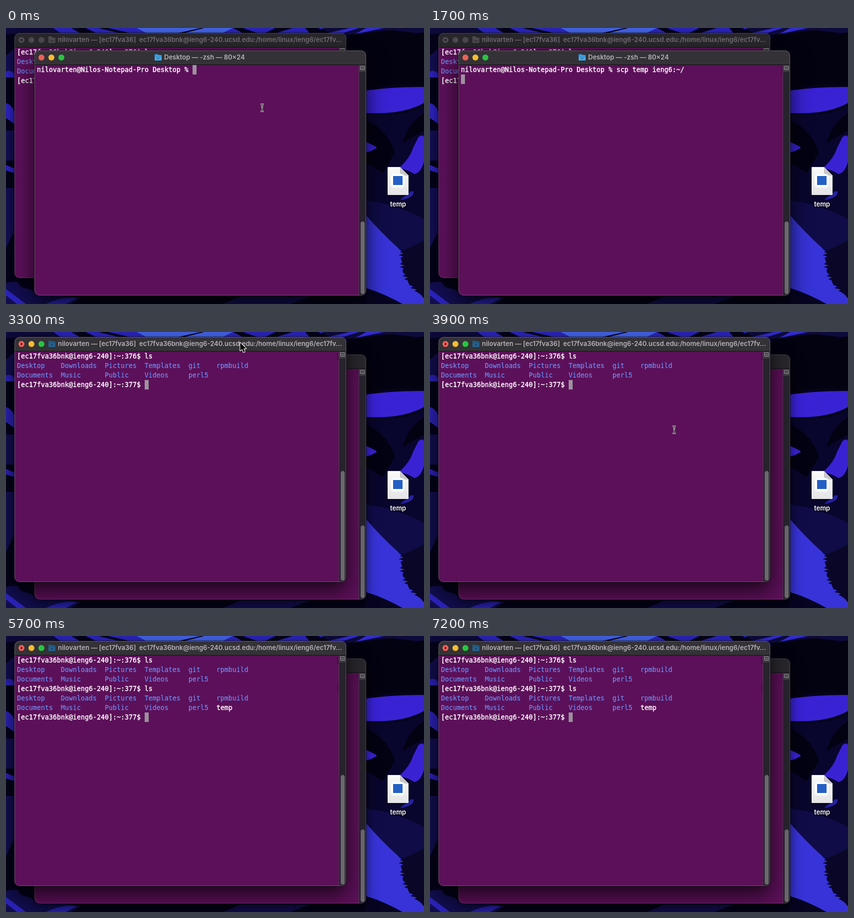
Recreate the animation shown at these times as an HTML page with a canvas. Size 838 px wide and 552 px high, loop 7.3 s.

```html
<!DOCTYPE html>
<html lang="en">
<head>
<meta charset="utf-8">
<title>Copying a file with scp</title>
<style>
  html, body { margin: 0; width: 838px; height: 552px; overflow: hidden; background: #05031a; }
  canvas { display: block; }
</style>
</head>
<body>
<canvas id="stage" width="838" height="552"></canvas>
<script>
const W = 838, H = 552, LOOP = 7300;
const ctx = document.getElementById('stage').getContext('2d');
const MONO = '"DejaVu Sans Mono", monospace';
const SANS = 'Inter, sans-serif';
const COL = 8, ROW = 19;
const WHITE = '#ffffff', BLUE = '#6c93fb';

// Times in ms
const T = { type: 250, typed: 1500, enter: 1600, copied: 2300, wake: 2600,
            front: 3100, leave: 3400, rest: 4100, l: 4900, s: 5100, list: 5400 };

const USER = 'nilovarten', COURSE = 'ec17fva36', LOGIN = COURSE + 'bnk';
const LOCAL = USER + '@Nilos-Notepad-Pro Desktop % ';
const REMOTE = n => `[${LOGIN}@ieng6-240]:~:${n}$ `;
const COMMAND = 'scp temp ieng6:~/';
const DIRS = [
  'Desktop    Downloads  Pictures  Templates  git    rpmbuild',
  'Documents  Music      Public    Videos     perl5'
];

const scenery = [
  ['#0d0a3c', 'M0 0H150L90 12H0Z M640 0H838V8L722 30L640 12Z'],
  ['#2b25c2', 'M95 0H130L150 11H110Z M160 0H640L600 12H185Z'],
  ['#4566ef', 'M262 0H455L430 12H285Z'],
  ['#05031a', 'M185 0H204L258 12H235Z M390 0H398L350 12H336Z M455 0H475L510 12H478Z M540 0H575L535 12H515Z M600 0H625L655 12H610Z'],
  ['#322bd0', 'M645 10L690 0H708L672 11Z M722 0H758L700 12Z'],
  ['#030210', 'M684 14L770 4L838 12V114Q780 108 722 121V45L684 40Z'],
  ['#3922d4', 'M722 125Q780 117 838 118V150Q795 174 722 170Z'],
  ['#09062d', 'M722 173Q795 179 838 157V380H722Z'],
  ['#030212', 'M722 184Q765 204 780 250L755 290L722 270Z M838 170Q805 190 795 230L838 205Z'],
  ['#3922d4', 'M722 228Q732 232 744 239Q735 246 722 249Z'],
  ['#3922d4', 'M827 218Q838 211 838 220V268Q831 290 819 292Q803 283 788 280Q810 260 816 240Z'],
  ['#2821a8', 'M795 340Q820 318 817 331Q812 341 790 344Z'],
  ['#100c48', 'M722 345Q780 352 838 382V552H722Z'],
  ['#3733d8', 'M722 375Q755 412 784 438L804 458L838 530V552H722Z'],
  ['#070421', 'M722 520Q760 532 795 552H722Z'],
  // left edge
  ['#130f53', 'M0 55L17 40V100L0 95Z M0 205H17V265H0Z M0 320H17V404L0 440Z'],
  ['#2c23be', 'M0 87Q10 83 17 92V99H0Z M0 150Q12 154 17 168V192L0 180Z M0 274L17 281V290L0 285Z'],
  // bottom edge
  ['#120e50', 'M0 510Q30 500 57 530L150 540L130 552H0Z M435 552L470 537H610L570 552Z'],
  ['#2a23ba', 'M0 522L40 552H22L0 535Z M80 552Q110 537 142 540L120 552Z'],
  ['#05031a', 'M18 500Q45 505 55 525L30 518Z']
].map(([color, d]) => [color, new Path2D(d)]);

// Ragged treetops on the lower right
const trees = new Path2D('M838 425');
for (let i = 0; i <= 30; i++) {
  const x = 790 + 45 * (i / 30) ** 3 + (i % 2 ? 5 : 0) + 3 * Math.sin(i * 2.3);
  trees.lineTo(x, 448 + i * 3);
}
trees.lineTo(W, 540);

function fill(color, path) { ctx.fillStyle = color; ctx.fill(path); }
function rect(color, x, y, w, h) { ctx.fillStyle = color; ctx.fillRect(x, y, w, h); }
function round(x, y, w, h, r) {
  const p = new Path2D();
  p.roundRect(x, y, w, h, r);
  return p;
}
function outline(color, path, width = 1) {
  ctx.strokeStyle = color;
  ctx.lineWidth = width;
  ctx.stroke(path);
}
function dot(color, x, y, r) {
  const p = new Path2D();
  p.arc(x, y, r, 0, 7);
  fill(color, p);
}
function text(str, x, y, font, color, align = 'left') {
  ctx.font = font;
  ctx.textAlign = align;
  ctx.fillStyle = color;
  ctx.fillText(str, x, y);
}
function shade(color, blur, y) {
  ctx.shadowColor = color;
  ctx.shadowBlur = blur;
  ctx.shadowOffsetY = y;
}

function drawDesktop() {
  rect('#05031a', 0, 0, W, H);
  for (const [color, path] of scenery) fill(color, path);
  fill('#090628', trees);

  ctx.save();
  shade('rgba(0,0,0,.5)', 4, 1);
  const g = ctx.createLinearGradient(0, 278, 0, 334);
  g.addColorStop(0, '#fafafa');
  g.addColorStop(1, '#e5e4e6');
  fill(g, new Path2D('M766 278H790L807 295V333Q807 334 806 334H766Q765 334 765 333V279Q765 278 766 278Z'));
  ctx.restore();
  fill('#c9c7cb', new Path2D('M790 278L807 295H792Q790 295 790 293Z'));
  fill('#ffffff', round(772, 292, 27, 27, 6));
  rect('#245fc5', 776, 296, 19, 18);

  ctx.save();
  shade('rgba(0,0,0,.9)', 3, 1);
  text('temp', 786, 357, '600 13px ' + SANS, WHITE, 'center');
  ctx.restore();
}

function drawFolder(x, y, color, top) {
  fill(top, round(x, y, 7, 5, 1));
  fill(color, round(x, y + 2, 14, 11, 1.5));
  rect(top, x, y + 4, 14, 1);
  rect('rgba(0,0,0,.2)', x + 4, y + 7, 6, 3);
}

function drawWindow(win, active) {
  const { x, y } = win, w = 665, h = 490;
  const frame = round(x, y, w, h, 10);
  ctx.save();
  shade(active ? 'rgba(0,0,0,.75)' : 'rgba(0,0,0,.55)', active ? 42 : 26, active ? 16 : 8);
  fill('#5c1059', frame);
  ctx.restore();

  ctx.save();
  ctx.clip(frame);
  rect(active ? '#343237' : '#29272c', x, y, w, 28);
  rect('#111014', x, y + 28, w, 1);
  rect('#27232c', x + 651, y + 29, 14, h);
  rect('#454049', x + 650, y + 29, 1, h);
  fill('#6b686e', round(x + 654, win.thumb, 8, y + h - 3 - win.thumb, 4));

  // Split button
  rect('#3c3940', x + 651, y + 29, 13, 14);
  outline('#a09da3', round(x + 653.5, y + 31.5, 8, 7, 0));
  rect('#a09da3', x + 655, y + 35, 5, 1);

  const lights = active ? ['#ed5f57', '#f6bd30', '#29c440'] : ['#4b494f', '#4b494f', '#4b494f'];
  lights.forEach((c, i) => dot(c, x + 14 + 20 * i, y + 14, 6));
  if (win.busy) dot(active ? '#7a0f0c' : '#222025', x + 14, y + 14, 2);
  drawFolder(win.folder, y + 7, active ? win.tint : '#4a474d', active ? win.tab : '#56535a');
  text(win.title, win.folder + 19, y + 18, '600 13px ' + SANS, active ? '#b5b3b8' : '#716e75');
  win.lines.forEach((line, i) => drawLine(line, x, y + 43 + ROW * i));
  ctx.restore();

  outline('rgba(0,0,0,.6)', round(x - .5, y - .5, w + 1, h + 1, 10.5));
  outline(active ? 'rgba(160,155,165,.45)' : 'rgba(140,135,145,.35)', round(x + .5, y + .5, w - 1, h - 1, 9.5));
}

function drawLine(line, x, y) {
  const left = x + 5;
  for (const [col, str, color = WHITE] of line.runs) {
    text(str, left + col * COL, y, '13.29px ' + MONO, color);
    ctx.strokeStyle = color;
    ctx.lineWidth = color === WHITE ? .4 : .15;
    ctx.strokeText(str, left + col * COL, y);
  }
  if (line.caret !== undefined) rect('#9c919e', left + line.caret * COL, y - 14, 8, ROW);
  if (line.mark) {
    rect('#350a36', x + 648, y - 11, 1, 13);
    rect('#350a36', x + 646, y - 11, 2, 1);
    rect('#350a36', x + 646, y + 1, 2, 1);
  }
}

const out = (...runs) => ({ runs });
const entered = str => ({ runs: [[0, str]], mark: true });
const prompt = str => ({ runs: [[0, str]], caret: str.length });

function localLines(t) {
  if (t < T.enter) {
    const part = Math.min(1, Math.max(0, (t - T.type) / (T.typed - T.type)));
    return [prompt(LOCAL + COMMAND.slice(0, Math.ceil(part * COMMAND.length)))];
  }
  const first = entered(LOCAL + COMMAND);
  if (t < T.copied) return [first, { runs: [], caret: 0 }];
  return [first, out([0, 'temp'], [46, '100%'], [54, '0'], [60, '0.0KB/s'], [70, '00:00']), prompt(LOCAL)];
}

function remoteLines(t) {
  const listing = DIRS.map(d => out([0, d, BLUE]));
  const lines = [entered(REMOTE(376) + 'ls'), ...listing];
  if (t < T.list) {
    const typed = t < T.l ? '' : t < T.s ? 'l' : 'ls';
    return [...lines, prompt(REMOTE(377) + typed)];
  }
  return [...lines, entered(REMOTE(377) + 'ls'), listing[0],
    out([0, DIRS[1], BLUE], [50, 'temp']), prompt(REMOTE(377))];
}

// Pointer stops: time, x, y
const stops = [[0, 513, 159], [T.wake, 513, 159], [T.front - 100, 469, 21],
               [T.leave, 469, 21], [T.rest, 494, 238], [LOOP, 494, 238]];
function pointerAt(t) {
  const i = stops.findIndex((s, n) => n && t < s[0]);
  const [t0, x0, y0] = stops[i - 1], [t1, x1, y1] = stops[i];
  const p = (t - t0) / (t1 - t0), e = p * p * (3 - 2 * p);
  return [x0 + (x1 - x0) * e, y0 + (y1 - y0) * e];
}

const arrow = new Path2D('M0 0V16L3.8 12.6L6.6 19L9.4 17.8L6.7 11.6H11.8Z');
const beam = new Path2D('M-3 -7H-2L0 -5.5L2 -7H3M-3 7H-2L0 5.5L2 7H3M0 -5.5V5.5M-1.5 2.5H1.5');

function drawPointer(t) {
  const hidden = (t >= T.type && t < T.wake) || t >= T.l;
  if (hidden) return;
  const [x, y] = pointerAt(t);
  const top = t < T.front ? 74 : 39;
  ctx.save();
  ctx.translate(Math.round(x) + .5, Math.round(y) + .5);
  ctx.lineJoin = 'round';
  if (y < top) {
    outline(WHITE, arrow, 2.2);
    fill('#000000', arrow);
  } else {
    outline(WHITE, beam, 3);
    outline('#000000', beam, 1.1);
  }
  ctx.restore();
}

const remote = {
  x: 17, y: 10, thumb: 278, folder: 85, busy: true, tint: '#25638f', tab: '#1c4c70',
  title: `${USER} — [${COURSE}]\u00a0 ${LOGIN}@ieng6-240.ucsd.edu:/home/linux/ieng6/${COURSE.slice(0, 6)}…`
};
const local = {
  x: 57, y: 45, thumb: 387, folder: 298, tint: '#43a9ea', tab: '#2482c6',
  title: 'Desktop — -zsh — 80×24'
};

function draw(t) {
  local.lines = localLines(t);
  remote.lines = remoteLines(t);
  drawDesktop();
  const order = t < T.front ? [remote, local] : [local, remote];
  order.forEach((win, i) => drawWindow(win, i === 1));
  drawPointer(t);
}

const start = performance.now();
function tick() {
  draw((performance.now() - start) % LOOP);
  requestAnimationFrame(tick);
}
tick();
</script>
</body>
</html>
```
